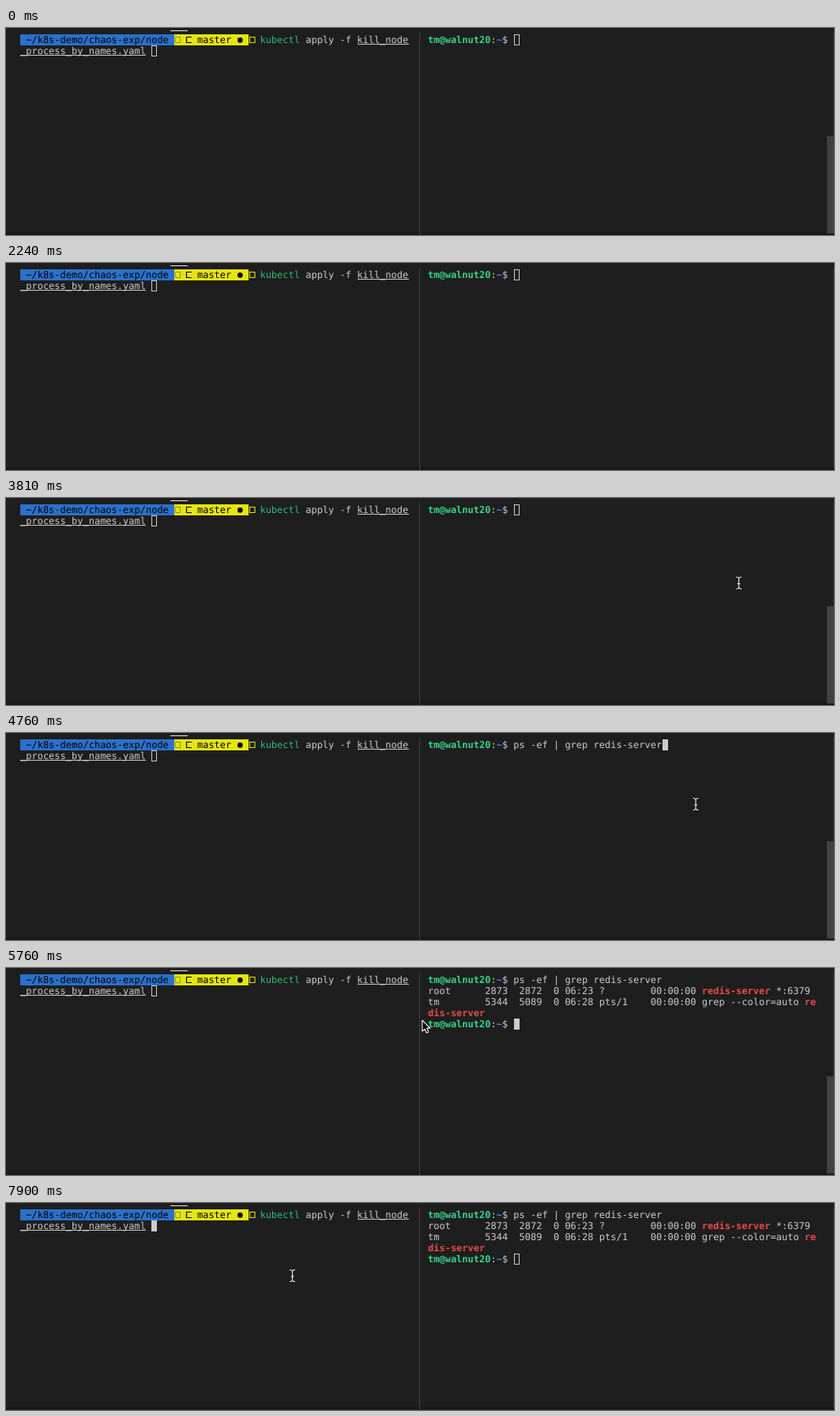
An HTML page for the animation above (8000 ms loop, 1048x262 px).

```html
<!DOCTYPE html>
<html lang="en">
<head>
<meta charset="utf-8">
<title>Terminal session</title>
<style>
  html, body { margin: 0; width: 100%; height: 100%; overflow: hidden; background: #1e1e1e; }
  svg { display: block; width: 1048px; height: 262px; }
  text {
    font: 12px "DejaVu Sans Mono", "Liberation Mono", monospace;
    white-space: pre;
    text-rendering: geometricPrecision;
  }
</style>
</head>
<body>
<svg id="stage" viewBox="0 0 1048 262" xmlns="http://www.w3.org/2000/svg"></svg>
<script>
const NS = "http://www.w3.org/2000/svg";
const LOOP = 8000;
const CELL = 7.224, ROW = 14, TOP = 8;
const LEFT = 18, RIGHT = 534;
const C = {
  bg: "#1e1e1e", text: "#cccccc", black: "#000000", blue: "#2b70cb", yellow: "#e5e510",
  green: "#2bba7a", lime: "#35d48d", sky: "#3b8eea", red: "#e94a48"
};

const stage = document.getElementById("stage");

function add(tag, attrs, parent = stage) {
  const el = document.createElementNS(NS, tag);
  for (const key in attrs) el.setAttribute(key, attrs[key]);
  parent.appendChild(el);
  return el;
}

const rect = (x, y, width, height, fill, parent) =>
  add("rect", { x, y, width, height, fill }, parent);

const path = (d, attrs, parent) => add("path", { d, fill: "none", ...attrs }, parent);

function write(origin, col, row, str, fill = C.text, bold = false, parent = stage) {
  const el = add("text", { x: origin + col * CELL, y: TOP + row * ROW + 11, fill }, parent);
  if (bold) el.style.fontWeight = "bold";
  el.textContent = str;
}

// Terminal cursor with a solid (focused) and a hollow (unfocused) state
function caret(x, y) {
  const solid = rect(x, y, 7, 14, C.text);
  const hollow = add("rect", {
    x: x + 0.5, y: y + 0.5, width: 6, height: 13, fill: "none", stroke: C.text
  });
  return state => {
    show(solid, state === "solid");
    show(hollow, state === "hollow");
  };
}

function show(el, on) {
  el.style.display = on ? "" : "none";
}

function prompt(row, parent) {
  write(RIGHT, 0, row, "tm@walnut20", C.lime, true, parent);
  write(RIGHT, 11, row, ":", C.text, false, parent);
  write(RIGHT, 12, row, "~", C.sky, true, parent);
  write(RIGHT, 13, row, "$", C.text, false, parent);
}

// Window chrome
rect(0, 0, 1048, 262, C.bg);
rect(0, 258, 1048, 4, "#191919");
rect(208, 3, 22, 1, "#e7e7e7");
rect(523, 6, 1, 256, "#444444");
rect(1047, 6, 1, 252, "#343434");
const scrollbar = rect(1039, 137, 9, 123, "#424242");

// Left pane
rect(18, 8, 195, 14, C.blue);
rect(213, 8, 94, 14, C.yellow);
write(LEFT, 1, 0, "~/k8s-demo/chaos-exp/node", C.black);
path("M214.5 11.5h6v7h-6z", { stroke: "#858f4a" });
path("M235 11.5h-6.5v7h6.5", { stroke: C.black, "stroke-width": 1.2 });
write(LEFT, 31, 0, "master", C.black);
add("circle", { cx: 296.3, cy: 15.4, r: 3.3, fill: C.black });
path("M308.5 11.5h6.5v7h-6.5z", { stroke: C.yellow, "stroke-width": 1.1 });
write(LEFT, 42, 0, "kubectl", C.green);
write(LEFT, 50, 0, "apply -f");
write(LEFT, 59, 0, "kill_node");
rect(445, 20, 65, 1, C.text);
write(LEFT, 0, 1, "_process_by_names.yaml");
rect(18, 34, 159, 1, C.text);

// Right pane
prompt(0);
const command = add("g", {});
write(RIGHT, 15, 0, "ps -ef | grep redis-server", C.text, false, command);

const output = add("g", {});
write(RIGHT, 0, 1, "root      2873  2872  0 06:23 ?        00:00:00", C.text, false, output);
write(RIGHT, 48, 1, "redis-server", C.red, true, output);
write(RIGHT, 61, 1, "*:6379", C.text, false, output);
write(RIGHT, 0, 2, "tm        5344  5089  0 06:28 pts/1    00:00:00 grep --color=auto", C.text, false, output);
write(RIGHT, 66, 2, "re", C.red, true, output);
write(RIGHT, 0, 3, "dis-server", C.red, true, output);
prompt(4, output);

const leftCaret = caret(184, 22);
const firstCaret = caret(643, 8);
const typedCaret = caret(831, 8);
const lastCaret = caret(643, 64);

// Mouse pointer: I-beam over text, arrow over edges
const mouse = add("g", {});
const beam = add("g", {}, mouse);
const beamShape = "M-3.5-7.5Q0-7.5 0-5Q0-7.5 3.5-7.5M0-5V5M-3.5 7.5Q0 7.5 0 5Q0 7.5 3.5 7.5M-2 1H2";
path(beamShape, { stroke: "#111111", "stroke-width": 2.6 }, beam);
path(beamShape, { stroke: "#f2f2f2", "stroke-width": 1.2 }, beam);
const arrow = path("M0 0V14L3.2 11.1L5.4 16L7.9 14.9L5.8 10.1H10Z", {
  fill: "#000000", stroke: "#ffffff", "stroke-width": 1.1, "stroke-linejoin": "round"
}, mouse);

const T = { enter: 3650, arrive: 4000, focus: 4100, recall: 4450, run: 4860, leave: 5480, rest: 6190, click: 6900 };

const clamp = v => Math.min(1, Math.max(0, v));
const phase = (t, from, to) => clamp((t - from) / (to - from));
const easeOut = (u, power) => 1 - (1 - u) ** power;
const mix = (a, b, u) => a + (b - a) * u;
const bend = (a, b, c, u) => mix(mix(a, b, u), mix(b, c, u), u);

function mouseAt(t) {
  if (t < T.leave) {
    const u = easeOut(phase(t, T.enter, T.arrive), 2);
    return [mix(1060, 873, u), mix(150, 90, u)];
  }
  const u = easeOut(phase(t, T.leave, T.rest), 2.25);
  return [mix(873, 362.5, u), bend(90, 33, 92, u)];
}

function scrollbarAlpha(t) {
  if (t < 1000) return 1 - phase(t, -40, 760);
  return phase(t, 3700, 3800) * (1 - phase(t, 6400, 7200));
}

function draw(t) {
  scrollbar.setAttribute("opacity", scrollbarAlpha(t));

  const typed = t >= T.recall, ran = t >= T.run, clicked = t >= T.click;
  show(command, typed);
  show(output, ran);
  leftCaret(clicked ? "solid" : "hollow");
  firstCaret(typed ? "" : t >= T.focus ? "solid" : "hollow");
  typedCaret(typed && !ran ? "solid" : "");
  lastCaret(!ran ? "" : clicked ? "hollow" : "solid");

  const [x, y] = mouseAt(t);
  const onEdge = Math.abs(x - 524) < 10 || x > 1036;
  show(mouse, t >= T.enter);
  show(beam, !onEdge);
  show(arrow, onEdge);
  mouse.setAttribute("transform", `translate(${x.toFixed(2)} ${y.toFixed(2)})`);
}

const start = performance.now();
function tick() {
  draw((performance.now() - start) % LOOP);
  requestAnimationFrame(tick);
}
tick();
</script>
</body>
</html>
```
